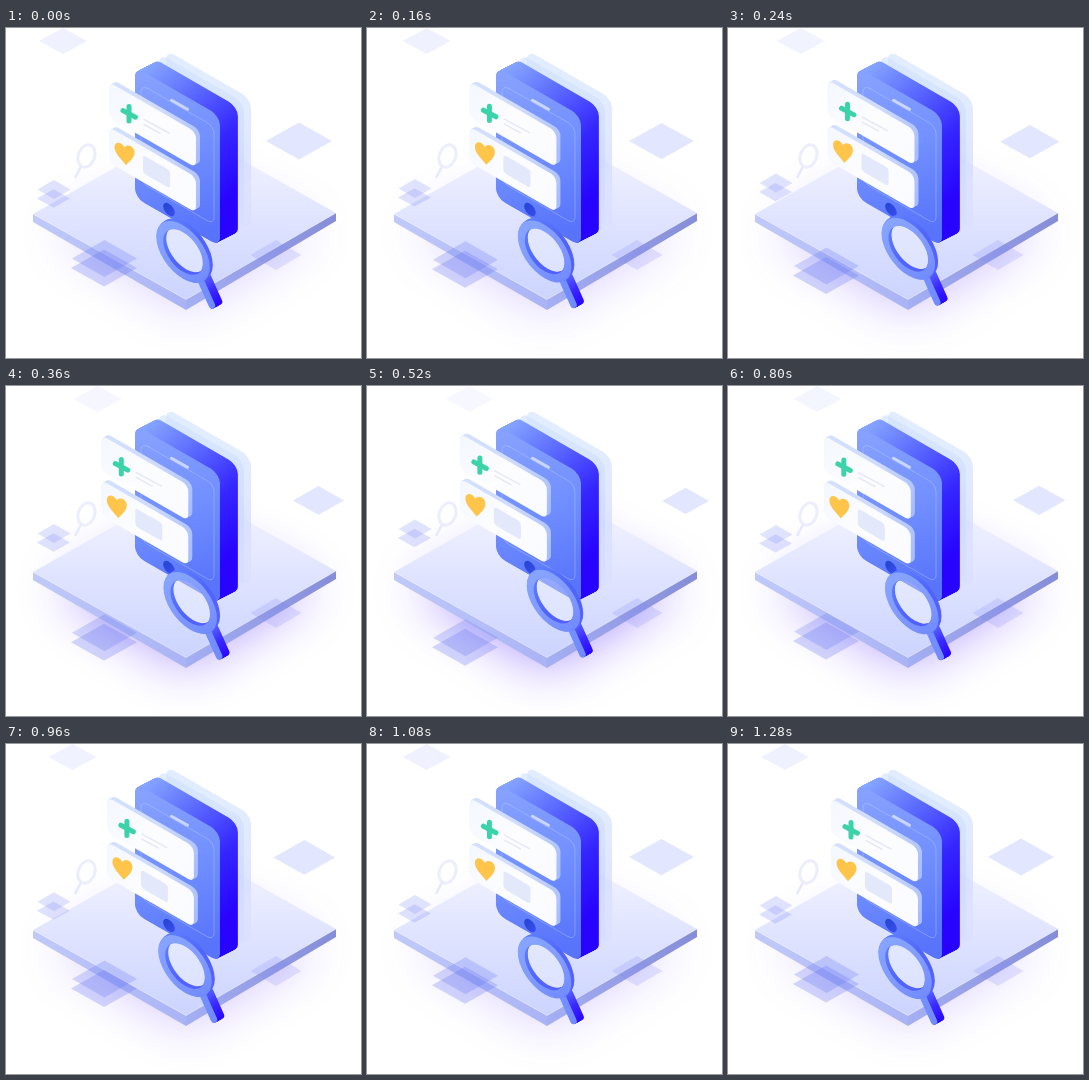
Write an HTML page with a canvas that moves like this. It is 355 by 330 pixels and loops after 3.4 s.

```html
<!DOCTYPE html>
<html lang="en">
<head>
<meta charset="utf-8">
<title>Isometric phone search</title>
<style>
html, body { margin: 0; width: 100%; height: 100%; overflow: hidden; background: #fff; }
canvas { display: block; width: 355px; height: 330px; }
</style>
</head>
<body>
<canvas id="stage"></canvas>
<script>
const W = 355, H = 330, LOOP = 3400, STEP = 40, MOVE = 560, START = 120;
const SLOPE = 0.577;
const canvas = document.getElementById('stage');
const ctx = canvas.getContext('2d');
const dpr = window.devicePixelRatio || 1;
canvas.width = W * dpr;
canvas.height = H * dpr;

const lerp = (a, b, p) => a + (b - a) * p;

// cubic-bezier(.25, .1, .25, 1)
function ease(x) {
  if (x <= 0) return 0;
  if (x >= 1) return 1;
  const curve = (s, a, b) => 3 * s * (1 - s) * (1 - s) * a + 3 * s * s * (1 - s) * b + s * s * s;
  let lo = 0, hi = 1;
  for (let i = 0; i < 30; i++) {
    const mid = (lo + hi) / 2;
    if (curve(mid, 0.25, 0.25) < x) lo = mid; else hi = mid;
  }
  return curve(lo, 0.1, 1);
}

function progress(ms) {
  const t = Math.floor((ms % LOOP) / STEP) * STEP;
  return ease((t - START) / MOVE) - ease((t - START - MOVE) / MOVE);
}

function gradient(x0, y0, x1, y1, ...colors) {
  const g = ctx.createLinearGradient(x0, y0, x1, y1);
  colors.forEach((c, i) => g.addColorStop(i / (colors.length - 1), c));
  return g;
}

function poly(fill, ...pts) {
  ctx.beginPath();
  for (let i = 0; i < pts.length; i += 2) ctx.lineTo(pts[i], pts[i + 1]);
  ctx.closePath();
  ctx.fillStyle = fill;
  ctx.fill();
}

function line(color, width, ...pts) {
  ctx.beginPath();
  for (let i = 0; i < pts.length; i += 2) ctx.lineTo(pts[i], pts[i + 1]);
  ctx.strokeStyle = color;
  ctx.lineWidth = width;
  ctx.lineCap = ctx.lineJoin = 'round';
  ctx.stroke();
}

function diamond(x, y, rx, ry, fill) {
  poly(fill, x, y - ry, x + rx, y, x, y + ry, x - rx, y);
}

// Builds a path in the plane of the phone front, with its corner at x, y
function onFace(x, y, build, slope = SLOPE) {
  ctx.beginPath();
  ctx.save();
  ctx.transform(1, slope, 0, 1, x, y);
  build();
  ctx.restore();
}

function panel(x, y, w, h, r, fill) {
  onFace(x, y, () => ctx.roundRect(0, 0, w, h, r));
  ctx.fillStyle = fill;
  ctx.fill();
}

function sweep(dx, dy, draw) {
  const n = Math.ceil(Math.abs(dx) * 2);
  for (let i = n; i > 0; i--) draw(dx * i / n, dy * i / n);
}

function shifted(dx, dy, draw) {
  ctx.save();
  ctx.translate(dx, dy);
  draw();
  ctx.restore();
}

function platform(p) {
  ctx.save();
  ctx.shadowColor = `rgba(112,70,255,${lerp(0.25, 0.6, p)})`;
  ctx.shadowBlur = 54 * dpr;
  ctx.shadowOffsetY = 17 * dpr;
  poly('#e6e7ff', 50, 186, 179, 130, 310, 186, 180, 266);
  ctx.restore();

  poly(gradient(179, 105, 179, 272, '#f6f7ff', '#e0e4ff', '#ccd4ff'), 27, 186, 179, 100, 330, 185, 180, 271.5);
  poly(gradient(27, 190, 180, 276, '#c0caf9', '#aab4f5'), 27, 186, 180, 271.5, 180, 282, 27, 194);
  poly(gradient(180, 276, 330, 190, '#a5aff3', '#858dd8'), 180, 271.5, 330, 185, 330, 193, 180, 282);
  line('rgba(255,255,255,0.55)', 0.8, 27, 186, 180, 271.5, 330, 185);
}

function faintLens() {
  ctx.beginPath();
  ctx.ellipse(80.5, 128, 8.2, 11.5, 0.35, 0, Math.PI * 2);
  ctx.strokeStyle = '#ecedfd';
  ctx.lineWidth = 3;
  ctx.stroke();
  line('#e7e9fd', 2.6, 74.5, 139.5, 69.5, 149);
}

function tiles(p) {
  ctx.save();
  ctx.globalAlpha = lerp(1, 0.48, p);
  diamond(lerp(57, 105, p), 13, 24, 13, '#eff1ff');
  ctx.restore();
  const s = lerp(1, 0.69, p);
  diamond(lerp(293, 320, p), lerp(113, 115, p), 33 * s, 18.5 * s, '#e2e6fe');

  const up = -19.5 * p, down = 22.5 * p;
  diamond(48, 161.5 + up, 16.5, 9.5, 'rgba(108,122,244,0.2)');
  diamond(47.5, 170.5 + up, 16.5, 9.2, 'rgba(108,122,244,0.22)');
  diamond(98.5, 230.5 + down, 32.5, 18.5, 'rgba(98,112,240,0.25)');
  diamond(98, 240 + down, 33, 18.5, 'rgba(98,112,240,0.27)');
  diamond(270, 227, 25.5, 15, 'rgba(126,130,245,0.2)');
}

function phone() {
  const body = (dx, dy, fill) => panel(129 + dx, 39 + dy, 85, 130.5, 9, fill);
  const haze = gradient(0, 60, 0, 202, 'rgba(208,225,255,0.62)', 'rgba(202,214,255,0.6)', 'rgba(205,212,255,0.15)');
  body(31, -17, haze);
  body(24, -13.5, haze);

  const side = gradient(138, 40, 236, 160, '#86a6ff', '#5a68ff', '#3526ff', '#2804ff');
  sweep(17.8, -9.2, (dx, dy) => body(dx, dy, side));
  body(0, 0, gradient(136, 50, 190, 205, '#86a1ff', '#718fff', '#5874fb'));

  onFace(129, 39, () => ctx.roundRect(6, 14, 73, 98, 7));
  ctx.strokeStyle = 'rgba(190,207,255,0.5)';
  ctx.lineWidth = 0.8;
  ctx.stroke();
  line('#c9d6ff', 3, 165.5, 72.3, 181.5, 81.3);

  onFace(163, 181.5, () => ctx.arc(0, 0, 5.8, 0, Math.PI * 2));
  ctx.fillStyle = gradient(158, 175, 168, 188, '#2446cf', '#3a4cf2');
  ctx.fill();
}

function card(y) {
  const edge = gradient(105, y, 196, y + 70, '#d3e0ff', '#cfdcff', '#a6bdff');
  sweep(4, -2.2, (dx, dy) => panel(103 + dx, y + dy, 87, 35.5, 6, edge));
  panel(103, y, 87, 35.5, 6, gradient(103, y, 190, y + 80, '#f3f7ff', '#fdfdff', '#fafbff'));
}

function cards() {
  card(54);
  line('#3dd3aa', 5, 123, 78.6, 123, 93);
  line('#3dd3aa', 5, 117, 82.6, 129.5, 89.2);
  line('#e6e9fa', 1.6, 138, 91.5, 163, 105);
  line('#e6e9fa', 1.6, 138, 96.5, 154, 105.2);

  card(99);
  onFace(118.5, 125.3, () => {
    ctx.moveTo(0, -6);
    ctx.bezierCurveTo(-3, -11, -10, -9.5, -10, -3);
    ctx.bezierCurveTo(-10, 3, -3, 7, 1.5, 11.5);
    ctx.bezierCurveTo(4.5, 7, 10, 2, 10, -4);
    ctx.bezierCurveTo(10, -10, 3, -11, 0, -6);
  }, 0.3);
  ctx.fillStyle = '#ffc54a';
  ctx.fill();
  panel(137, 127, 27, 18, 3, '#e3e8fb');
}

function ring(dx, dy, fill) {
  onFace(177 + dx, 224 + dy, () => {
    ctx.arc(0, 0, 26.8, 0, Math.PI * 2);
    ctx.moveTo(19.8, 0);
    ctx.arc(0, 0, 19.8, 0, Math.PI * 2);
  });
  ctx.fillStyle = fill;
  ctx.fill('evenodd');
}

function lens() {
  const deep = gradient(194, 250, 214, 278, '#5a6aff', '#3a28ff', '#2804ff');
  sweep(7, -4, (dx, dy) => line(deep, 6.5, 195 + dx, 253 + dy, 206 + dx, 277.5 + dy));
  line(gradient(196, 252, 206, 280, '#7590ff', '#6f8bff'), 6.5, 195, 253, 206, 277.5);

  onFace(178, 223, () => ctx.arc(0, 0, 20.5, 0, Math.PI * 2));
  ctx.fillStyle = 'rgba(236,239,255,0.4)';
  ctx.fill();
  const side = gradient(158, 200, 206, 245, '#5d7dff', '#5064fb', '#5460ff');
  sweep(3, -2.6, (dx, dy) => ring(dx, dy, side));
  ring(0, 0, gradient(160, 195, 196, 255, '#86a4ff', '#829bff', '#718bff'));
}

function draw(ms) {
  const p = progress(ms);
  ctx.setTransform(dpr, 0, 0, dpr, 0, 0);
  ctx.fillStyle = '#fff';
  ctx.fillRect(0, 0, W, H);
  platform(p);
  faintLens();
  tiles(p);
  phone();
  shifted(-10.7 * p, -7 * p, cards);
  shifted(10 * p, -9.8 * p, lens);
}

let begin = null;
function tick(now) {
  if (begin === null) begin = now;
  draw(now - begin);
  requestAnimationFrame(tick);
}
draw(0);
requestAnimationFrame(tick);
</script>
</body>
</html>
```
